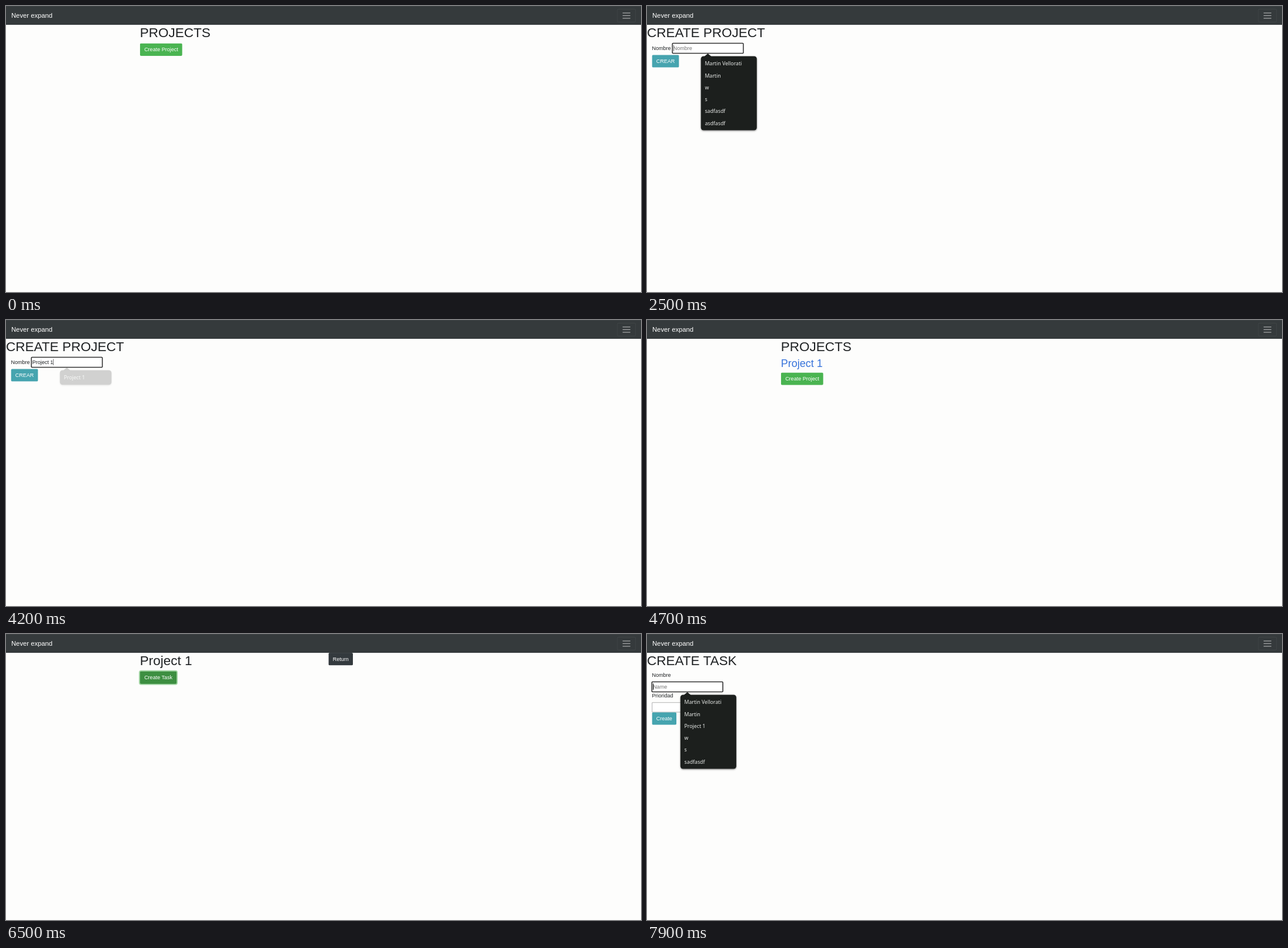
Write an HTML page that moves like this. It is 1080x487 px and loops after 8000 ms.

```html
<!DOCTYPE html>
<html lang="en">
<head>
<meta charset="utf-8">
<title>Projects</title>
<style>
html, body { margin: 0; width: 100%; height: 100%; overflow: hidden; background: #fdfdfc; }
#app {
  position: absolute; left: 0; top: 0; width: 1920px; height: 866px;
  transform: scale(.5625); transform-origin: 0 0;
  font: 16px/24px "Liberation Sans", Arial, sans-serif; color: #1f2224;
}
#app * { box-sizing: border-box; }
nav { position: absolute; left: 0; top: 0; width: 1920px; height: 57px; background: #353a3c; border-top: 1px solid #464b4d; }
.brand { position: absolute; left: 16px; top: 13px; font-size: 20px; line-height: 30px; color: #fff; }
.menu {
  position: absolute; left: 1848px; top: 8px; width: 56px; height: 40px; padding: 4px 12px;
  border: 1px solid rgba(255,255,255,.1); border-radius: 4px;
}
.menu svg { display: block; }
.page, .page > * { position: absolute; white-space: nowrap; }
.page { left: 0; top: 57px; width: 1920px; }
h1, h2 { margin: 0; font-weight: 500; line-height: 1.2; }
h1 { font-size: 40px; left: 0; top: 0; }
h2 { font-size: 32px; top: 56px; color: #3874db; }
.in { left: 405px; }
.form { left: 15px; }
.btn { padding: 6px 12px; border: 1px solid transparent; border-radius: 4px; color: #fff; }
.green { background: #4ab451; }
.cyan { background: #46a4af; }
.dark { background: #343a3e; }
.page > .field {
  width: 214px; height: 30px; padding: 2px; white-space: pre;
  border: 1px solid #767676; border-radius: 1px; background: #fff;
}
.field.focus { border-color: #101010; box-shadow: 0 0 0 1.5px #101010; border-radius: 2px; }
.field i { font-style: normal; color: #757575; }
.field b { display: inline-block; width: 1.6px; height: 19px; margin-right: -1.6px; vertical-align: -4px; background: #111; }
.page > .list {
  padding: 4px 12px; border-radius: 8px; background: #1c1f1d; color: #e9ebe9; white-space: pre;
  font: 15.5px/36px "Noto Sans", "Open Sans", sans-serif; box-shadow: 0 2px 5px rgba(0,0,0,.45);
}
.list::before {
  content: ""; position: absolute; left: 10px; top: -8px; width: 22px; height: 9px;
  background: inherit; clip-path: polygon(50% 0, 100% 100%, 0 100%);
}
</style>
</head>
<body>
<div id="app">
  <nav>
    <span class="brand">Never expand</span>
    <div class="menu"><svg width="30" height="30" viewBox="0 0 30 30"><path d="M4 7h22M4 15h22M4 23h22" stroke="#fff" stroke-opacity=".55" stroke-width="2" stroke-linecap="round"/></svg></div>
  </nav>
  <div class="page" id="projects">
    <h1 class="in">PROJECTS</h1>
    <h2 class="in" id="link">Project 1</h2>
    <div class="in btn green" id="newProject">Create Project</div>
  </div>
  <div class="page" id="projectForm">
    <h1>CREATE PROJECT</h1>
    <span class="form" style="top:59px">Nombre</span>
    <div class="field" id="projectName" style="left:76.5px;top:56px"></div>
    <div class="form btn cyan" style="top:91px">CREAR</div>
    <div class="list" id="projectList" style="left:163px;top:95px"></div>
  </div>
  <div class="page" id="project">
    <h1 class="in">Project 1</h1>
    <div class="btn dark" style="left:975px;top:0">Return</div>
    <div class="in btn green" id="newTask" style="top:56px">Create Task</div>
  </div>
  <div class="page" id="taskForm">
    <h1>CREATE TASK</h1>
    <span class="form" style="top:56px">Nombre</span>
    <div class="form field" id="taskName" style="top:88px"></div>
    <span class="form" style="top:118px">Prioridad</span>
    <div class="form field" style="top:150px"></div>
    <div class="form btn cyan" style="top:180px">Create</div>
    <div class="list" id="taskList" style="left:101px;top:127px;width:169px">Martin Vellorati
Martin
Project 1
w
s
sadfasdf</div>
  </div>
</div>
<script>
const LOOP = 8000;
const $ = id => document.getElementById(id);
const clamp = x => Math.max(0, Math.min(1, x));
const ramp = (t, start, length = 150) => clamp((t - start) / length);

const pages = [[0, 'projects'], [1800, 'projectForm'], [4600, 'projects'], [5700, 'project'], [6700, 'taskForm']];
const keys = [2800, 2900, 3100, 3400, 3500, 3600, 3800, 3900, 4100];
const history = 'Martin Vellorati\nMartin\nw\ns\nsadfasdf\nasdfasdf';

function greenButton(el, hover, glow) {
  const mix = [[74, 61], [180, 143], [81, 65]].map(([a, b]) => a + (b - a) * hover);
  el.style.background = `rgb(${mix})`;
  el.style.boxShadow = `0 0 0 3.2px rgba(76,175,80,${glow * .5})`;
}

function field(el, focused, text, hint, sinceInput) {
  const caret = focused && sinceInput % 1000 < 500 ? '<b></b>' : '';
  const html = text ? text + caret : `${caret}<i>${hint}</i>`;
  el.classList.toggle('focus', focused);
  if (el.innerHTML !== html) el.innerHTML = html;
}

function render(t) {
  const page = pages.filter(([at]) => t >= at).pop()[1];
  for (const el of document.querySelectorAll('.page')) el.style.display = el.id === page ? 'block' : 'none';

  const listed = t >= 4600;
  const over = t >= 5200;
  $('link').style.display = listed ? 'block' : 'none';
  $('link').style.color = over ? '#2459b0' : '#3874db';
  $('link').style.textDecoration = over ? 'underline' : 'none';
  $('newProject').style.top = listed ? '102.4px' : '56px';
  greenButton($('newProject'), listed ? 0 : ramp(t, 600), listed ? 0 : ramp(t, 1500));
  greenButton($('newTask'), ramp(t, 6150), ramp(t, 6300));

  const typed = keys.filter(at => t >= at);
  const last = typed.length ? typed[typed.length - 1] : 2100;
  field($('projectName'), t >= 2100, 'Project 1'.slice(0, typed.length), 'Nombre', t - last);
  field($('taskName'), t >= 6900, '', 'Name', t - 6900);

  const list = $('projectList');
  const narrow = t >= 2900;
  list.textContent = narrow ? 'Project 1' : history;
  list.style.width = narrow ? '156px' : '169px';
  list.style.opacity = ramp(t, 2250) * (1 - ramp(t, 4080));
  $('taskList').style.opacity = ramp(t, 7050);
}

const start = performance.now();
function tick() {
  render((performance.now() - start) % LOOP);
  requestAnimationFrame(tick);
}
tick();
</script>
</body>
</html>
```
